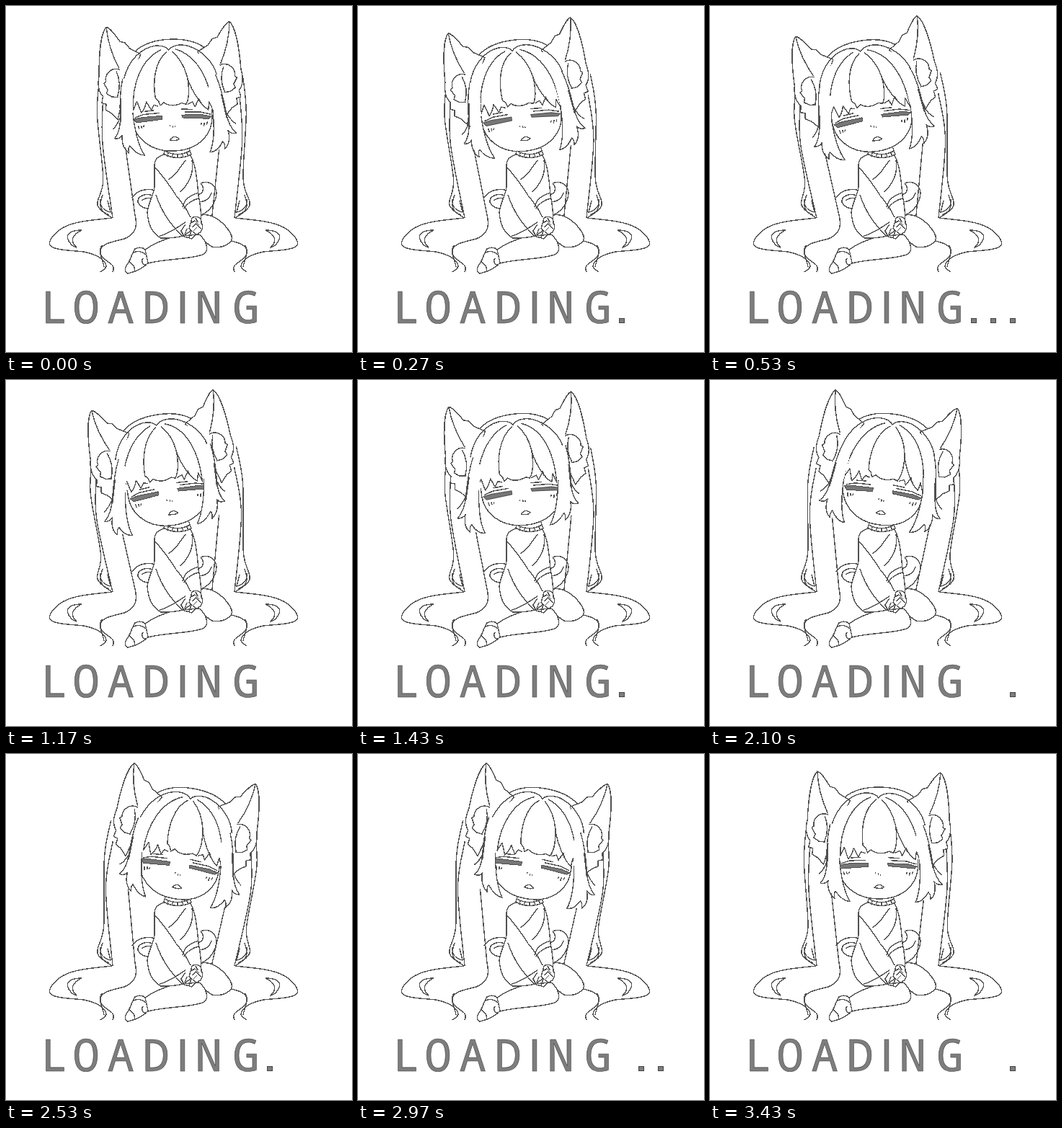
Recreate the animation shown at these times as an HTML page. Size 480 by 480 pixels, loop 3460 ms.

```html
<!DOCTYPE html>
<html lang="en">
<head>
<meta charset="utf-8">
<title>Loading</title>
<style>
html, body { margin: 0; width: 100%; height: 100%; overflow: hidden; background: #fff; }
svg { display: block; width: 100vw; height: 100vh; }
.art { fill: none; stroke: #505050; stroke-width: 1.4; stroke-linejoin: round; shape-rendering: crispEdges; }
.skin { fill: #fff; }
.blank { fill: #fff; stroke: none; }
.lid { fill: #777; stroke-width: 1; }
.word { font: 300 62px "Noto Sans Mono", monospace; fill: #7d7d7d; stroke: #444; stroke-width: .6; text-anchor: middle; }
.word .bar { font-family: Roboto, sans-serif; font-weight: 400; }
.dots { fill: #7d7d7d; stroke: #444; shape-rendering: crispEdges; }
</style>
</head>
<body>
<svg viewBox="0 0 480 480">
  <defs>
    <g id="tail">
      <path d="M147 294C122 297 97 298 80 307C68 314 58 325 61 332C66 339 90 339 108 341C128 345 138 353 139 361C138 366 134 366 131 369"/>
      <path d="M179 290C183 307 179 317 164 323C149 327 134 329 131 338C129 349 139 352 147 359C151 363 149 367 148 369"/>
      <path d="M133 332C127 342 135 353 136 362"/>
      <path d="M105 311C86 311 83 318 87 326C90 331 93 334 98 335C88 326 92 317 105 311Z"/>
      <path d="M134 262C128 279 131 285 143 290M131 268C130 278 136 284 145 286L141 270"/>
    </g>
    <g id="ear">
      <path class="skin" d="M147 25C139 33 135 62 134 92C131 104 132 114 138 121L136 130L142 132L141 140L149 145L157 154L170 110L193 65L178 56L172 48L165 46C159 37 153 27 147 25Z"/>
      <path d="M147 25C148 46 154 66 162 83"/>
      <path d="M163 85C151 80 141 91 143 101L140 103L145 112L143 117L150 122L159 123"/>
      <path d="M158 87C163 99 162 112 158 122"/>
    </g>
    <g id="lock">
      <path class="blank" d="M170 96L180 115L177 145C177 167 180 187 187 205L165 200L157 183L148 180L158 158L163 120Z"/>
      <path d="M168 98C162 116 160 136 159 151C158 164 154 174 148 180C153 181 157 179 159 176C157 187 160 196 166 201C165 195 166 193 168 191C173 199 179 205 187 205C180 192 177 173 177 145"/>
      <path d="M159 151C155 159 152 164 147 167M163 125L159 158"/>
    </g>
  </defs>

  <g class="art">
    <path id="strands"/>
    <use href="#tail"/>
    <use href="#tail" transform="translate(465) scale(-1 1)"/>

    <!-- fluffy tail -->
    <path d="M204 263C193 259 182 264 183 272C186 279 196 283 202 280M175 266C180 257 192 253 204 255M188 270C193 266 199 266 203 268"/>
    <path d="M263 263C273 261 277 254 270 246C281 241 292 249 292 260C291 274 282 285 271 290M265 272C276 272 283 267 285 259"/>

    <!-- legs -->
    <path class="skin" d="M272 290C288 287 307 304 313 319C316 329 300 337 286 334C280 331 274 325 266 318"/>
    <path class="skin" d="M193 338C204 330 215 326 231 320L268 317C278 325 282 338 275 344C257 352 222 350 197 357Z"/>
    <path class="skin" d="M179 337C184 334 190 335 193 338L197 356C190 365 178 369 169 371C163 369 165 362 170 356C174 349 175 342 179 337Z"/>
    <path d="M177 342C183 339 189 341 194 345M171 355C176 358 179 363 179 368M190 350C187 355 190 360 194 359"/>

    <!-- sweater -->
    <path class="skin" d="M219 206C208 210 206 214 206 222L206 247C207 260 198 270 196 286C197 304 204 316 215 322C226 323 236 321 247 319L270 300C272 284 268 270 267 262C265 240 263 220 256 207Z"/>
    <path d="M207 224C215 233 226 247 236 263C243 271 250 280 256 293M208 262C214 280 225 301 245 319M250 214C242 220 240 232 225 241M258 214C261 231 254 246 242 258M267 259C253 264 247 269 245 279M267 267C258 269 250 275 247 281M213 319C224 317 238 307 249 300M249 303L243 312L247 320L258 323L267 312"/>
    <path class="skin" d="M258 294C264 290 272 294 271 301C275 307 271 315 264 317L254 309Z"/>
    <path d="M256 301L262 298L268 304M258 307L264 302L270 309M260 312L265 307M263 294L266 300M251 309L248 317M257 312L254 321"/>
    <path class="skin" d="M222 195L219 205C229 212 246 212 257 206L253 195Z"/>
    <path d="M220 201C231 207 245 207 255 201M225 204L224 209M231 206L230 210M238 206V210M245 206L246 210M251 204L253 208"/>

    <g id="head">
      <path class="skin" d="M186 60C198 50 214 46 234 46C252 46 269 50 281 59L290 100H176Z"/>
      <use href="#ear"/>
      <use href="#ear" transform="translate(465) scale(-1 1)"/>
      <path class="blank" d="M232 61C205 46 169 84 164 120L175 160H290L303 120C294 77 262 47 232 61Z"/>
      <path class="skin" d="M177 125V154C178 176 196 201 234 201C270 201 288 178 288 154V125"/>

      <g id="face" transform="translate(0 1.5)">
        <path class="lid" d="M179 153L191 151L219 150V155L207 156L183 158Z"/>
        <path class="lid" d="M246 150L275 151L287 154L283 157L261 155L247 154Z"/>
        <path d="M181 151L193 147L215 146M250 146L272 147L286 151M194 143L208 142M246 142L262 143"/>
        <path d="M185 162L186 167M189 162L190 166M193 162L192 165M273 162L272 165M277 162L276 167M281 161L280 165"/>
        <path d="M229 163V165M233 164V167M236 165V167M228 184C230 181 235 178 238 181L241 183C239 186 233 185 228 184Z"/>
      </g>

      <g id="bangs">
        <path class="blank" d="M228 62L184 80L177 140L188 145L197 136L203 143L211 137L232 138L252 135L263 141L268 134L280 146L288 145L285 90L240 62Z"/>
        <path d="M230 63C211 76 207 105 209 127L213 131L215 137L220 133C227 139 237 139 245 135L251 137C257 127 257 110 255 98C252 82 246 72 237 63"/>
        <path d="M222 60C194 71 178 105 177 142L183 130L188 146C191 143 194 139 196 131L202 143L206 136L212 138"/>
        <path d="M242 60C270 70 286 101 288 148L283 135L281 146C275 142 271 137 269 130L263 141L260 134L253 137M255 98C257 111 263 123 271 136"/>
      </g>

      <g id="locks">
        <use href="#lock"/>
        <use href="#lock" transform="translate(465) scale(-1 1)"/>
      </g>
      <path d="M168 98C176 72 194 56 214 54C224 54 230 57 232 61C236 55 248 52 261 57C281 65 294 83 297 98"/>
    </g>
  </g>

  <text class="word" y="439.5" x="67 111 159 208 245 281 333">LOAD<tspan class="bar">I</tspan>NG</text>
  <g class="dots">
    <rect x="362.5" y="433.5" width="7" height="6"/>
    <rect x="389.5" y="433.5" width="7" height="6"/>
    <rect x="416.5" y="433.5" width="7" height="6"/>
  </g>
</svg>
<script>
const LOOP = 3460;
const DOT_LOOP = LOOP / 3;
const MAX_TILT = 9.7;
const LAG = 800;
const STRANDS = [
  [[133, 100], [130, 150], [136, 240], [127, 276], [147, 294]],
  [[138, 128], [137, 190], [148, 294]],
  [[168, 190], [179, 290]]
];

const pick = id => document.getElementById(id);
const head = pick("head"), bangs = pick("bangs"), locks = pick("locks"), strands = pick("strands");
const dots = document.querySelectorAll(".dots rect");

const clamp = v => Math.min(1, Math.max(0, v));
const ramp = (t, from, to) => (1 - Math.cos(Math.PI * clamp((t - from) / (to - from)))) / 2;

// The head leans left, right, then left again across the loop seam, after a short rest.
function tiltAt(t) {
  t = (t + LOOP) % LOOP;
  const lean = 1 - ramp(Math.max(t, 100), -428, 472) + ramp(t, 1170, 2270) - ramp(t, 3000, 3900);
  return MAX_TILT * (2 * lean - 1);
}

// Smooth curve through a list of points.
function curve(p) {
  let d = "M" + p[0];
  for (let i = 0; i < p.length - 1; i++) {
    const a = p[i - 1] || p[i], b = p[i], c = p[i + 1], e = p[i + 2] || c;
    d += `C${b.map((v, k) => v + (c[k] - a[k]) / 6)} ${c.map((v, k) => v - (e[k] - b[k]) / 6)} ${c}`;
  }
  return d;
}

// Strands follow the head at the top, bulge outward halfway and stay put near the floor.
function bend([x, y], tilt) {
  const w = clamp((265 - y) / 150), side = Math.sign(x - 232.5);
  const bulge = side * Math.abs(tilt) * Math.sin(Math.PI * w) / 2;
  return [x + 1.3 * tilt * w + bulge, y + (x - 232.5) * tilt * w * 0.008];
}

const hang = (deg, y) => `translate(0 ${y}) skewX(${-deg}) translate(0 ${-y})`;

function draw(t) {
  const tilt = tiltAt(t);
  const swing = -(tilt + tiltAt(t - LAG)) / 2;
  head.setAttribute("transform", `rotate(${tilt} 235 200)`);
  bangs.setAttribute("transform", hang(swing / 2, 75));
  locks.setAttribute("transform", hang(swing, 125));
  strands.setAttribute("d", STRANDS.map(s =>
    curve(s.map(p => bend(p, tilt))) + curve(s.map(([x, y]) => bend([465 - x, y], tilt)))).join(""));
  const phase = t % DOT_LOOP;
  dots.forEach((dot, i) => {
    const shown = phase >= 100 + 190 * i && phase < 620 + 260 * i;
    dot.setAttribute("visibility", shown ? "visible" : "hidden");
  });
}

const start = performance.now();
function tick() {
  draw((performance.now() - start) % LOOP);
  requestAnimationFrame(tick);
}
tick();
</script>
</body>
</html>
```
